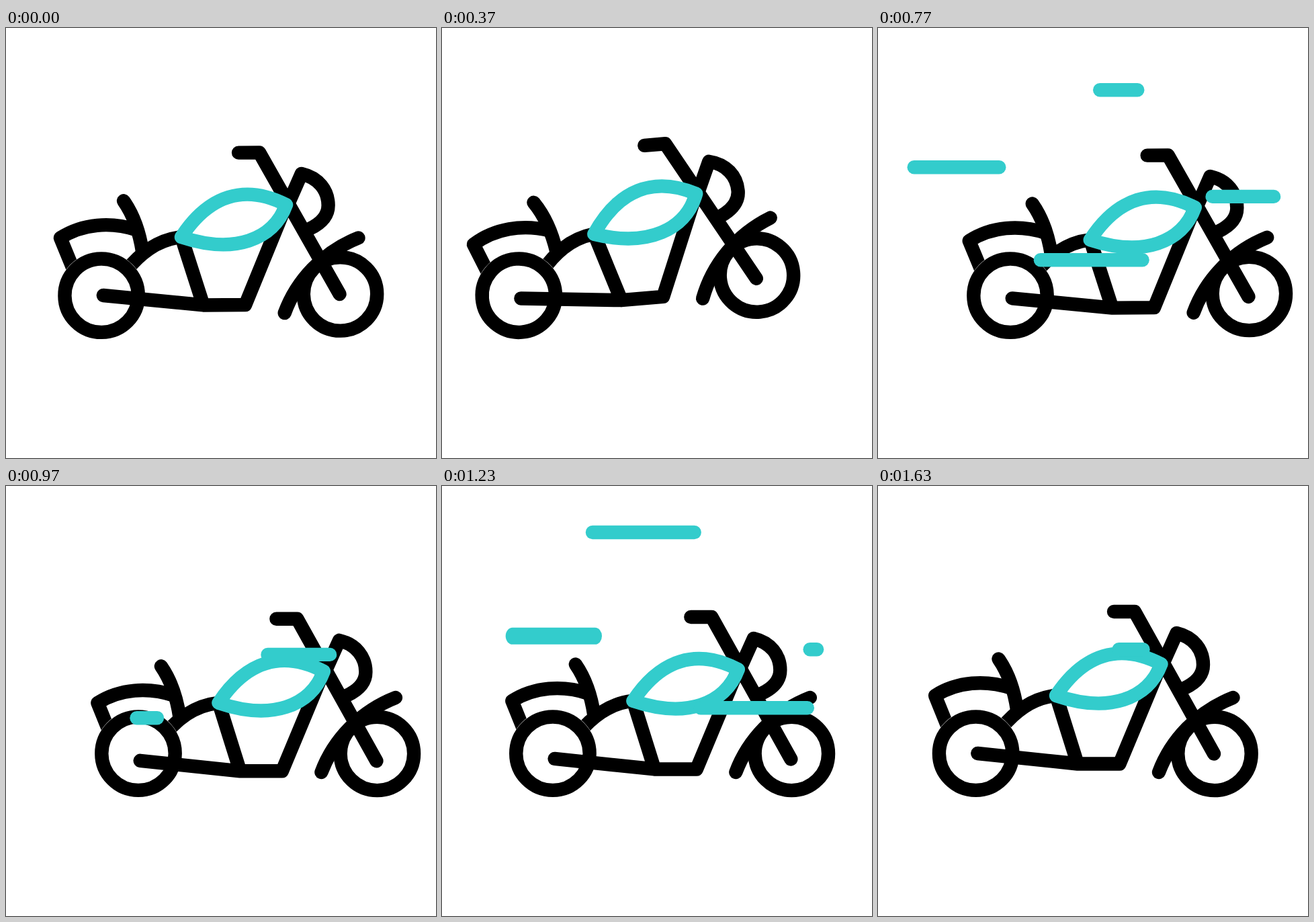
Recreate the animation shown at these times as an HTML page. Size 640x640 px, loop 1.67 s.

```html
<!DOCTYPE html>
<html lang="en">
<head>
<meta charset="utf-8">
<title>Motorbike</title>
<style>
  html, body { margin: 0; width: 100%; height: 100%; overflow: hidden; background: #fff; }
  svg { display: block; width: 100%; height: 100%; }
  .ink, .tank { fill: none; stroke: #000; stroke-width: 20.4; stroke-linecap: round; stroke-linejoin: round; }
  .tank { stroke: #3cc; }
  #streaks { fill: #3cc; }
</style>
</head>
<body>
<svg viewBox="0 0 640 640">
  <!-- The bike tilts around its rear axle; sprung parts also sag -->
  <g id="bike">
    <g transform="translate(-145.6 -398.2)">
      <g class="ink sprung">
        <path d="M104 359L85 312C118 291 160 288 199 301"/>
        <path d="M179.5 257.5C193 277 202 299 207 333"/>
        <path d="M183 361C203 337 228 316 264 312"/>
      </g>
      <circle cx="145.6" cy="398.2" r="65.3" fill="#fff"/>
      <g class="ink">
        <circle cx="145.6" cy="398.2" r="54.7"/>
        <circle cx="501" cy="398.4" r="54.7"/>
        <path d="M418 426C436 378 475 336 528.5 315"/>
      </g>
      <g class="sprung">
        <path class="ink" d="M148.3 398L297 413.5H359.5L421 266M265.5 313L297 413.5"/>
        <path class="ink" d="M351 187H382L500 398.5"/>
        <path class="ink" d="M427 258L444.5 219C470 225 484 244 484 266C484 282 473 293 456 301"/>
        <path class="tank" d="M265 312C306 250.3 359.5 232.8 421.5 265C402 317 344 338.8 265 312Z"/>
      </g>
    </g>
  </g>
  <!-- Each streak is drawn at full length and shown piece by piece from its start tick -->
  <g id="streaks">
    <rect data-start="11.7" x="320" y="82" height="20.4"/>
    <rect data-start="13.7" x="43.5" y="197" height="20.4"/>
    <rect data-start="16.85" x="184.3" y="335.1" height="20.4"/>
    <rect data-start="18.75" x="379.3" y="240.7" height="20.4"/>
    <rect data-start="30.5" x="337" y="320" height="20.4"/>
    <rect data-start="30.85" x="166.4" y="58.8" height="20.4"/>
    <rect data-start="31.8" x="18" y="210.8" height="25"/>
    <rect data-start="35.75" x="348.3" y="233" height="20.4"/>
  </g>
</svg>
<script>
const LOOP = 1670;
const LAST_TICK = 47.7;   // 30 ticks per second; the motion rests here until the loop restarts
const CAP = 10.2;
const TRAVEL = 199.6;     // distance each end of a streak covers

const bike = document.getElementById('bike');
const sprung = document.querySelectorAll('.sprung');
const streaks = document.querySelectorAll('#streaks rect');

// Smooth step from 0 to 1 between two ticks
function ease(tick, from, to) {
  const u = Math.min(1, Math.max(0, (tick - from) / (to - from)));
  return u * u * (3 - 2 * u);
}

const hump = (tick, from, peak, to) => ease(tick, from, peak) - ease(tick, peak, to);

function drawBike(tick) {
  const x = 145.6 - 60.2 * ease(tick, -1.3, 7.6)    // back off
    + 111.6 * ease(tick, 7.6, 17.8)                 // lunge
    - 51.4 * ease(tick, 30, 42);                    // settle
  const tilt = -7.4 * hump(tick, -1.3, 8, 15.7) - 0.5 * hump(tick, 16, 24, 28);
  const sag = 14.8 * ease(tick, 8, 16) - 10.9 * ease(tick, 16, 24)
    + 10.1 * ease(tick, 24, 32) - 14 * ease(tick, 32, 43);

  bike.setAttribute('transform', `translate(${x} 398.2) rotate(${tilt})`);
  sprung.forEach(part => part.setAttribute('transform', `translate(0 ${sag})`));
}

// The head runs left first, the tail follows
function drawStreak(bar, tick) {
  const age = tick - bar.dataset.start;
  const head = ease(age, 0, 9);
  const tail = ease(age, 5.9, 14.2);
  const visible = head > 0 && tail < 1;
  bar.setAttribute('width', visible ? 2 * CAP + (head - tail) * TRAVEL : 0);
  bar.setAttribute('transform', `translate(${(1 - head) * TRAVEL} 0)`);
}

function draw(ms) {
  const step = Math.ceil(3 * (Math.floor(ms / 10) + 1) / 10) - 1;
  const tick = Math.min(step, LAST_TICK);
  drawBike(tick);
  streaks.forEach(bar => drawStreak(bar, tick));
}

streaks.forEach(bar => {
  bar.setAttribute('rx', CAP);
  bar.setAttribute('ry', bar.getAttribute('height') / 2);
});

const begin = performance.now();
function loop() {
  draw((performance.now() - begin) % LOOP);
  requestAnimationFrame(loop);
}
loop();
</script>
</body>
</html>
```
